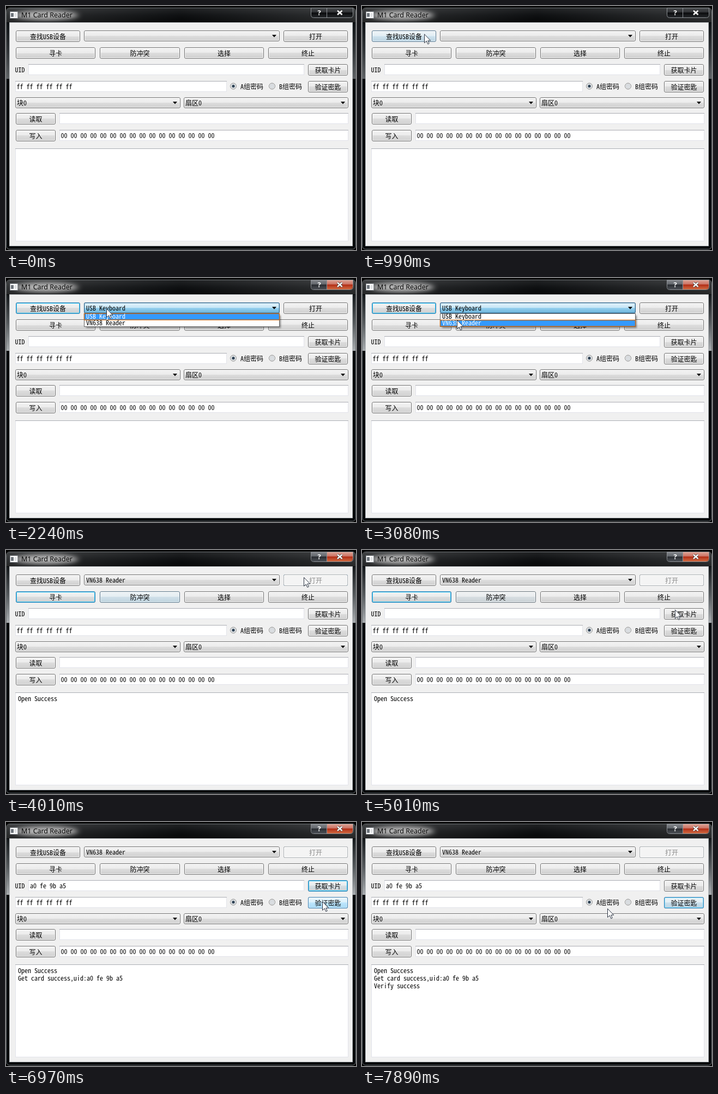
An HTML page for the animation above (7.99 s loop, 642 by 449 pixels).

```html
<!DOCTYPE html>
<html lang="zh">
<head>
<meta charset="utf-8">
<title>M1 Card Reader</title>
<style>
html, body { margin: 0; width: 100%; height: 100%; overflow: hidden; background: #000; }
svg { display: block; width: 642px; height: 449px; }
text { font: 12px "Noto Sans Mono CJK SC", "Noto Sans CJK SC", "Noto Sans CJK JP", "Noto Sans CJK", monospace; font-feature-settings: "hwid"; fill: #000; }
.mid { text-anchor: middle; }
.title { font: 12.5px "Open Sans", "Noto Sans", sans-serif; }
.help { font: bold 13px "Open Sans", sans-serif; fill: #fff; text-anchor: middle; }
.in { fill: none; stroke: #fff; stroke-opacity: .75; }
.normal { fill: url(#normal); stroke: #707070; }
.hot, .focus { stroke: #3c7fb1; }
.hot { fill: url(#hot); }
.focus { fill: url(#normal); }
.focus + .in { stroke: #2cc5f5; stroke-opacity: 1; }
.down { fill: url(#down); stroke: #2c628b; }
.down + .in { stroke: #6a9cb8; stroke-opacity: .5; }
.off { fill: #f4f4f4; stroke: #adb2b5; }
.off ~ text { fill: #8a8a8a; }
.edit { fill: #fff; stroke: #e2e3ea; }
.lit { fill: #fff; }
.pulse { fill: url(#hot); opacity: 0; animation: pulse 998.75ms infinite; }
@keyframes pulse {
  0%, 100% { opacity: .05; animation-timing-function: steps(2); }
  50% { opacity: .35; animation-timing-function: steps(2); }
}
</style>
</head>
<body>
<svg id="stage" viewBox="0 0 642 449" xmlns="http://www.w3.org/2000/svg"></svg>
<script>
const LOOP = 7990;
const CLICK = { find: 1380, list: 2070, pick: 3080, open: 4010, card: 5550, verify: 7120 };
const PRESS = 150;
const css = [];

// Stops are [ms, value, steps]; without steps the value holds until the next stop.
function track(prop, stops) {
  const name = 'k' + css.length;
  const frames = stops.map(([ms, value, steps]) =>
    `${(ms / LOOP * 100).toFixed(3)}% { ${prop}: ${value}; animation-timing-function: ${steps ? `steps(${steps})` : 'step-end'} }`);
  const last = stops[stops.length - 1][1];
  css.push(`@keyframes ${name} { ${frames.join(' ')} 100% { ${prop}: ${last} } }`);
  return `style="animation: ${name} ${LOOP}ms infinite"`;
}
const group = (style, body) => `<g ${style}>${body}</g>`;

function during(from, to, body) {
  const end = to < LOOP ? [[to, 0]] : [];
  return group(track('opacity', [[0, 0], [from, 1], ...end]), body);
}

// Hover light: quick rise, slower fall.
function hover(from, to, body, peak = 1) {
  const end = to < LOOP ? [[to, peak, 5], [to + 400, 0]] : [];
  return group(track('opacity', [[0, 0], [from, 0, 2], [from + 160, peak], ...end]), body);
}

const gradient = (id, colors, dir = 'x2="0" y2="1"') =>
  `<linearGradient id="${id}" ${dir}>${colors.map((c, i) =>
    `<stop offset="${i / (colors.length - 1)}" stop-color="${c}"/>`).join('')}</linearGradient>`;

// Two-part glossy fill with a hard break in the middle.
const gloss = (id, a, b, c, d) => gradient(id, [a, b, d])
  .replace('</linear', '</linear').replace(`<stop offset="0.5" stop-color="${b}"/>`,
    `<stop offset=".5" stop-color="${b}"/><stop offset=".5" stop-color="${c}"/>`);

const text = (x, y, s, cls = '') => `<text x="${x}" y="${y}" class="${cls}">${s}</text>`;

const face = (x, y, w, kind, h = 21) =>
  `<rect class="${kind}" x="${x + .5}" y="${y + .5}" width="${w - 1}" height="${h - 1}" rx="2.5"/>` +
  `<rect class="in" x="${x + 1.5}" y="${y + 1.5}" width="${w - 3}" height="${h - 3}" rx="1.5"/>`;

// focus and over are [from, to] spans; press is a click time.
function button(x, y, w, label, { focus, over, press, peak, kind = 'normal' } = {}) {
  let s = face(x, y, w, kind);
  if (focus) s += during(...focus, face(x, y, w, 'focus') +
    `<rect class="pulse" x="${x + 2}" y="${y + 2}" width="${w - 4}" height="17" rx="1"/>`);
  if (over) s += hover(...over, `<rect class="hot" x="${x + .5}" y="${y + .5}" width="${w - 1}" height="20" rx="2.5"/>` +
    `<rect class="in" x="${x + 1.5}" y="${y + 1.5}" width="${w - 3}" height="18" rx="1.5" stroke-width=".6"/>`, peak);
  if (press) s += during(press, press + PRESS, face(x, y, w, 'down'));
  return s + text(x + w / 2, y + 15.5, label, 'mid');
}

const combo = (x, y, w, label, states = '') => face(x, y, w, 'normal', 20) + states +
  `<path d="M${x + w - 14} ${y + 8}h8l-4 4.500z"/>` + text(x + 3, y + 14.5, label);

const edit = (x, y, w, h, value = '') =>
  `<rect class="edit" x="${x + .5}" y="${y + .5}" width="${w - 1}" height="${h - 1}"/>` +
  `<path d="M${x} ${y + .5}h${w}" stroke="#abadb3"/>` + text(x + 2.5, y + 14.5, value);

const radio = (x, dot) =>
  `<circle cx="${x}" cy="147.500" r="5.500" fill="#f4f4f4" stroke="#858686"/>` +
  `<circle cx="${x}" cy="147.500" r="4" fill="#cfd4d8"/><circle cx="${x}" cy="147.500" r="2.500" fill="${dot}"/>`;

const sides = '<path d="M1 31h5v103h-5zM636 31h5v103h-5z" fill="url(#side)"/>';
const cross = 'M608 8.5l8.5 7.5M616.5 8.5l-8.5 7.5';
const bar = 'M1 30V9q0-5 5-5h630q5 0 5 5v21z';

const frame = `
<rect width="642" height="449"/>
<rect x=".5" y="3.5" width="641" height="444" rx="6" fill="#05080b" stroke="#6f7477"/>
<path d="${bar}" fill="url(#bar)"/><path d="${bar}" fill="url(#sheen)" opacity=".13"/>
<g clip-path="url(#top)"><ellipse cx="74" cy="17" rx="58" ry="9" fill="#b4b4b4" filter="url(#blur)"/></g>
<g opacity=".55">${sides}</g>${during(CLICK.find, LOOP, sides)}
<rect x="6.5" y="30.5" width="629" height="411" fill="#f0f0f0" stroke="#b9bdc0"/>
<path d="M7.5 10.5h14v12h-14z" fill="#fff" stroke="#8b9096"/>
<path d="M9 13h5v7h-5z" fill="#6d747b"/>
<path d="M15.5 14h4M15.5 16.5h4M15.5 19h4" stroke="#b4b9be"/>
${text(28, 21, 'M1 Card Reader', 'title')}
<path d="M559.5 3.5v13q0 5 5 5h67q5 0 5-5v-13z" fill="url(#cap)" stroke="#8d9195"/>
${during(CLICK.find, LOOP, `<path d="M560 4h28v17h-23q-5 0-5-5z" fill="url(#help)"/>
<path d="M589 4h47v12q0 5-5 5h-42z" fill="url(#red)"/>`)}
<path d="M588.5 4v17" stroke="#8d9195"/>
${text(574.5, 17, '?', 'help')}
<path d="${cross}" stroke="#333" stroke-width="4"/>
<path d="${cross}" stroke="#fff" stroke-width="2.400"/>`;

const device = 'VN638 Reader';
const closed = CLICK.pick + 70;
const reply = 160;

const form =
  button(18, 45, 118, '查找USB设备', { focus: [CLICK.find, CLICK.open], over: [910, 1610], press: CLICK.find }) +
  combo(143, 45, 359, '', hover(1530, CLICK.list, face(143, 45, 359, 'hot', 20)) +
    during(CLICK.list, closed, face(143, 45, 359, 'down', 20))) +
  during(CLICK.find + 80, closed, text(147, 59.5, 'USB Keyboard')) +
  during(closed, LOOP, text(147, 59.5, device)) +
  button(509, 45, 118, '打开', { over: [3480, CLICK.open] }) +
  during(CLICK.open, LOOP, button(509, 45, 118, '打开', { kind: 'off' })) +
  button(18, 76, 146, '寻卡', { focus: [CLICK.open, CLICK.card] }) +
  button(172, 76, 147, '防冲突', { over: [closed, 4700], peak: .4 }) +
  button(327, 76, 146, '选择') +
  button(481, 76, 146, '终止') +
  text(16.5, 122, 'UID') + edit(41, 107, 506, 20) +
  during(CLICK.card + reply, LOOP, text(44, 121.5, 'a0 fe 9b a5')) +
  button(554, 107, 73, '获取卡片', { focus: [CLICK.card, CLICK.verify], over: [5080, 6420], press: CLICK.card }) +
  edit(17, 138, 388, 20, 'ff ff ff ff ff ff') +
  radio(417, '#2b3f52') + text(430, 152.5, 'A组密码') +
  radio(488, '#dcdfe2') + text(501, 152.5, 'B组密码') +
  button(554, 138, 73, '验证密匙', { focus: [CLICK.verify, LOOP], over: [6420, 7700], press: CLICK.verify }) +
  combo(17, 168, 303, '块0') + combo(326, 168, 302, '扇区0') +
  button(18, 197, 73, '读取') + edit(98, 197, 530, 20) +
  button(18, 228, 73, '写入') + edit(98, 228, 530, 20, Array(16).fill('00').join(' ')) +
  edit(17, 262, 611, 171) +
  during(CLICK.open, LOOP, text(22, 277.5, 'Open Success')) +
  during(CLICK.card + reply, LOOP, text(22, 291.5, 'Get card success,uid:a0 fe 9b a5')) +
  during(7500, LOOP, text(22, 305.5, 'Verify success'));

const option = (y, label, from, to) => text(147, y + 10, label) + during(from, to,
  `<rect x="143.500" y="${y + .5}" width="358" height="11.500" fill="#39f" stroke="#c0691c" stroke-width="1.500"/>` +
  text(147, y + 10, label, 'lit'));

const swap = 2540;
const popup = during(CLICK.list, closed,
  '<rect x="147" y="69" width="357" height="23" opacity=".4" filter="url(#shade)"/>' +
  '<rect x="143.500" y="65.500" width="358" height="24" fill="#fff" stroke="#646464"/>' +
  option(65, 'USB Keyboard', CLICK.list, swap) + option(77, device, swap, closed));

// Cursor moves: leave, arrive, x, y.
const moves = [
  [670, 1150, 110, 55], [1380, 1920, 184, 56], [2240, 2700, 174, 77], [3080, 3710, 546, 50],
  [4700, 5240, 580, 123], [6420, 6500, 580, 146], [7500, 7890, 450, 159]
];
let [px, py] = [146, 23];
const place = (x, y) => `translate(${x.toFixed(1)}px, ${y.toFixed(1)}px)`;
const stops = [[0, place(px, py)]];
for (const [from, to, x, y] of moves) {
  const n = Math.round((to - from) / 78);
  for (let i = 1; i <= n; i++) {
    const u = i / n, ease = u * (2 - u);
    stops.push([from + (to - from) * u, place(px + (x - px) * ease, py + (y - py) * ease)]);
  }
  [px, py] = [x, y];
}
const cursor = during(moves[0][0], LOOP, group(track('transform', stops),
  '<path d="M.5 .5V16.500L4.300 13L6.800 18.700L9.200 17.600L6.800 12.200H11.700Z" fill="#fff" stroke="#27303f"/>'));

const defs = `<defs>
${gloss('normal', '#f3f3f3', '#ebebeb', '#dddddd', '#cfcfcf')}
${gloss('hot', '#eaf6fd', '#d9f0fc', '#bee6fd', '#a7d9f5')}
${gloss('down', '#e5f4fc', '#c4e5f6', '#98d1ef', '#68b3db')}
${gloss('cap', '#4a4d50', '#2b2d30', '#0b0c0e', '#25282b')}
${gloss('help', '#85888d', '#5d6167', '#2b2e33', '#4c5056')}
${gloss('red', '#dda597', '#c9695a', '#b32f17', '#cf6a42')}
${gradient('bar', ['#26282a', '#111315', '#060708'])}
${gradient('sheen', ['#fff', '#000', '#fff'], '')}
${gradient('side', ['#15181b', '#55595c', '#a9adb0'])}
<filter id="blur" x="-30%" y="-100%" width="160%" height="300%"><feGaussianBlur stdDeviation="6 4"/></filter>
<filter id="shade"><feGaussianBlur stdDeviation="1.500"/></filter>
<clipPath id="top"><path d="M1 4h640v25h-640z"/></clipPath>
</defs>`;

document.getElementById('stage').innerHTML = `${defs}<style>${css.join('\n')}</style>${frame}${form}${popup}${cursor}`;
</script>
</body>
</html>
```
